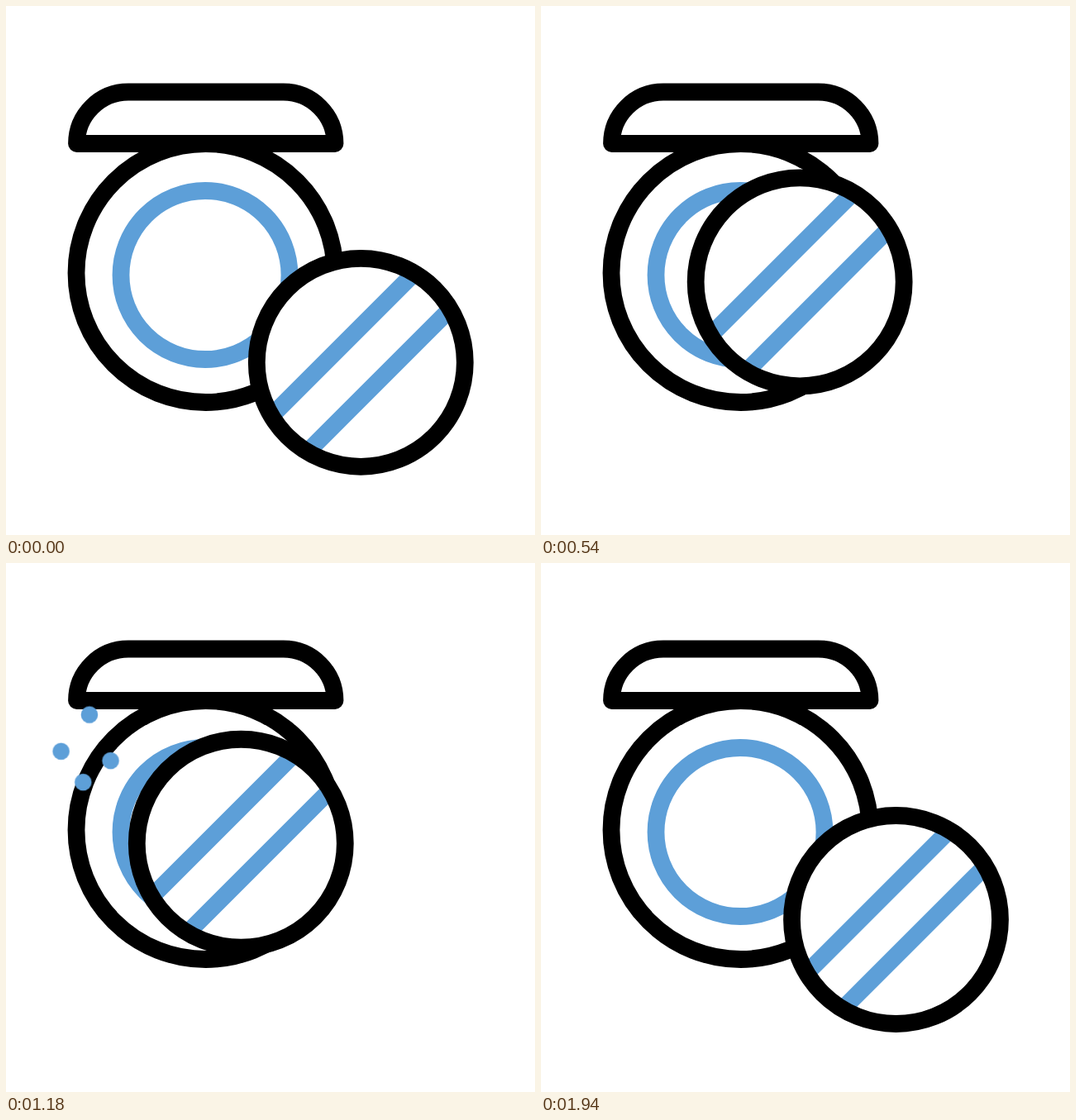
Animation of 640 by 640 pixels, one loop 2400 ms. Source, as an HTML page:

```html
<!DOCTYPE html>
<html lang="en">
<head>
<meta charset="utf-8">
<title>Compact powder</title>
<style>
  html, body { margin: 0; width: 100%; height: 100%; overflow: hidden; background: #fff; }
  svg { display: block; width: 100vw; height: 100vh; }
  .ink, .tint { fill: none; stroke-width: 20.8; stroke-linejoin: round; }
  .ink { stroke: #000; }
  .tint { stroke: #5d9fd8; }

  /* Approach in an arc, lift, dab again, slide back to rest. */
  .puff {
    offset-path: path("M429.5 431.5 Q388 391 354 364 C340 353 326 341 313.5 334 C297 325 281 332 272.5 345.5 Q266 355 262 363.5 Q268 346 282 340 L290 336.5 Q268 346 262 363.5 Q345 401 429.5 431.5");
    offset-rotate: 0deg;
    animation: dab 2400ms linear infinite;
  }
  @keyframes dab {
    0% { offset-distance: 0; }
    15% { offset-distance: 101.4px; }
    22.5% { offset-distance: 151.9px; }
    30.833% { offset-distance: 199.4px; }
    35% { offset-distance: 220.3px; animation-timing-function: ease; }
    46.25% { offset-distance: 260.8px; animation-timing-function: ease-in-out; }
    57.5% { offset-distance: 300.9px; animation-timing-function: cubic-bezier(.4, .1, .2, 1); }
    80.833%, 100% { offset-distance: 100%; }
  }

  /* Each speck flies through four points, once per dab. */
  .dust circle {
    fill: #5d9fd8;
    animation: fly 2400ms linear infinite, show 2400ms step-end infinite;
  }
  @keyframes fly {
    0%, 35% { transform: translate(var(--a)); }
    40.833% { transform: translate(var(--b)); }
    46.667% { transform: translate(var(--c)); animation-timing-function: cubic-bezier(.1, .4, .3, 1); }
    57% { transform: translate(var(--d)); }
    57.05%, 57.5% { transform: translate(var(--a)); }
    63.333% { transform: translate(var(--b)); }
    69.167% { transform: translate(var(--c)); animation-timing-function: cubic-bezier(.1, .4, .3, 1); }
    80.4%, 100% { transform: translate(var(--d)); }
  }
  @keyframes show {
    0% { visibility: hidden; }
    34.8% { visibility: visible; }
    80.4%, 100% { visibility: hidden; }
  }
</style>
</head>
<body>
<svg viewBox="0 0 640 640">
  <circle class="ink" cx="241.5" cy="323" r="156.5"/>
  <path class="ink" d="M85.5 166.5 A62.5 62.5 0 0 1 148 104 H335.5 A62.5 62.5 0 0 1 398 166.5 Z"/>
  <circle class="tint" cx="241" cy="325.5" r="102"/>

  <g class="dust">
    <circle r="10.3" style="--a:161px,250px; --b:130px,224px; --c:107px,196px; --d:97px,175.5px"/>
    <circle r="10.3" style="--a:138.5px,248px; --b:105.5px,241px; --c:74.5px,230.5px; --d:61.5px,226px"/>
    <circle r="10.3" style="--a:161px,252px; --b:146px,246.5px; --c:130.5px,241px; --d:124px,238px"/>
    <circle r="10.3" style="--a:150.5px,266px; --b:124.5px,272px; --c:100px,267px; --d:89px,264px"/>
  </g>

  <g class="puff">
    <circle r="126" fill="#fff"/>
    <path class="tint" d="M-103.75 60.25 L60.25 -103.75 M-60.25 103.75 L103.75 -60.25"/>
    <circle class="ink" r="126"/>
  </g>
</svg>
</body>
</html>
```
